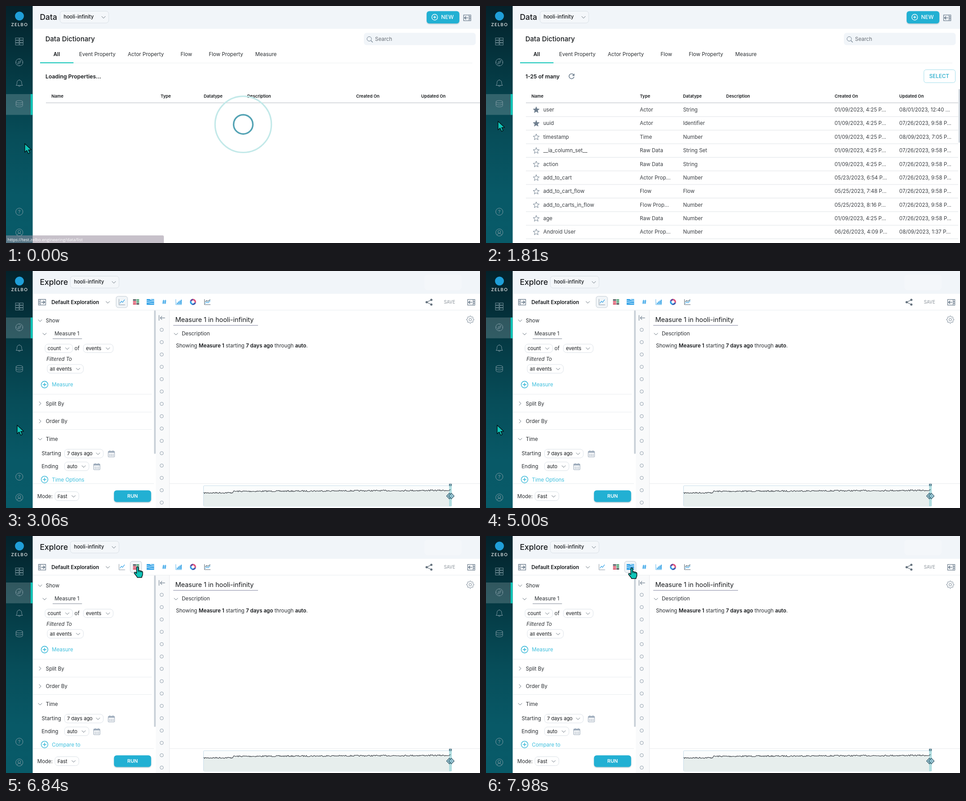
An HTML page that plays this animation: 1057x530 px, repeating every 8000 ms.

```html
<!DOCTYPE html>
<html lang="en">
<head>
<meta charset="utf-8">
<title>Data dictionary and exploration</title>
<style>
html, body { margin: 0; width: 100%; height: 100%; overflow: hidden; background: #fff; }
svg { display: block; width: 100%; height: 100%; font-family: Inter, sans-serif; }
text { white-space: pre; }
</style>
</head>
<body>
<svg id="stage" viewBox="0 0 1057 530"></svg>
<script>
const LOOP = 8000;
const INK = '#2b2f33', DARK = '#15181b', SLATE = '#6f7f8f', AQUA = '#22b0d3', TEAL = '#0fc5b8';

// Markup helpers
const attrs = o => Object.entries(o).map(([k, v]) => ` ${k}="${v}"`).join('');
const el = (tag, o, inner = '') => `<${tag}${attrs(o)}>${inner}</${tag}>`;
const rect = (x, y, w, h, fill, o = {}) => el('rect', { x, y, width: w, height: h, fill, ...o });
const circle = (cx, cy, r, o = {}) => el('circle', { cx, cy, r, fill: 'none', ...o });
const line = (d, stroke, width = 1, o = {}) =>
  el('path', { d, stroke, 'stroke-width': width, fill: 'none', ...o });
const text = (x, y, s, size = 11.6, fill = INK, weight = 400, o = {}) =>
  el('text', { x, y, 'font-size': size, fill, 'font-weight': weight, ...o }, s);
const group = (id, inner, o = {}) => el('g', { id, ...o }, inner);
const at = (x, y, inner) => el('g', { transform: `translate(${x} ${y})` }, inner);
const round = { 'stroke-linecap': 'round', 'stroke-linejoin': 'round' };

const chevron = (x, y, turn = 0, color = '#66727d') =>
  line('M-4 -2L0 2L4 -2', color, 1, { transform: `translate(${x} ${y}) rotate(${turn})`, ...round });

const pill = (x, y, w, h, label, o = {}) =>
  rect(x, y, w, h, '#fff', { rx: 7, stroke: '#dce2e8', ...o }) +
  text(x + 5.8, y + h / 2 + 4, label, 11, DARK) +
  chevron(x + w - 11.8, y + h / 2 + 0.5);

const button = (x, y, w, h) =>
  rect(x, y + 1.5, w, h, '#5f8696', { rx: 6, opacity: 0.45, filter: 'url(#soft)' }) +
  rect(x, y, w, h, AQUA, { rx: 6 });

const addLink = (y, id, label) =>
  circle(86, y, 7.5, { stroke: AQUA, 'stroke-width': 1.3 }) +
  line(`M82 ${y}h8M86 ${y - 4}v8`, AQUA, 1.3) +
  text(102.3, y + 4.3, label, 11.5, '#3dbfdd', 400, { id });

// Side panel toggle; dir -1 points left, 1 points right
const panelIcon = (x, y, dir) => el('g', { transform: `translate(${x} ${y}) scale(${dir} 1)` },
  line('M-8 -6.3H8V6.3H-8ZM-4.2 -6V6M-8 -2H-4.2M-8 2H-4.2', SLATE, 1.3) +
  line('M-2 0H5.5M2.5 -3.3L6 0L2.5 3.3', SLATE, 1.7));

const starPath = Array.from({ length: 10 }, (_, i) => {
  const r = i % 2 ? 3.1 : 7.2, a = -Math.PI / 2 + i * Math.PI / 5;
  return (i ? 'L' : 'M') + (r * Math.cos(a)).toFixed(2) + ' ' + (r * Math.sin(a)).toFixed(2);
}).join('') + 'Z';

const gearPath = Array.from({ length: 32 }, (_, i) => {
  const r = i % 4 < 2 ? 8.2 : 6.4, a = (i - 0.5) * Math.PI / 16;
  return (i ? 'L' : 'M') + (r * Math.cos(a)).toFixed(2) + ' ' + (r * Math.sin(a)).toFixed(2);
}).join('') + 'Z';

// Sidebar
const NAV_Y = { boards: 79.5, explore: 126, alerts: 172.5, data: 218.5, help: 460, account: 506.5 };
const navIcons = {
  boards: [-8, -2.4, 3.2].map(y => [-8.6, 0.7].map(x =>
    rect(x, y, 7.9, 4.6, 'none', { stroke: 'currentColor', 'stroke-width': 0.9 })).join('')).join(''),
  explore: circle(0, 0, 8, { stroke: 'currentColor' }) +
    line('M4 -4.2L1.5 1.5L-4 4.2L-1.5 -1.5ZM-1.5 -1.5L1.5 1.5M0 -8v2M0 8v-2M-8 0h2M8 0h-2', 'currentColor', 0.9),
  alerts: line('M-7.3 5H7.3C5.3 3 5.2 1 5.2 -1.2C5.2 -4.5 3 -6.8 0 -6.8S-5.2 -4.5 -5.2 -1.2C-5.2 1 -5.3 3 -7.3 5ZM-2 5.4a2 2 0 0 0 4 0M0 -6.8V-8', 'currentColor', 1),
  data: line('M-7.4 -4.4a7.4 2.8 0 0 1 14.8 0a7.4 2.8 0 0 1 -14.8 0V4.4a7.4 2.8 0 0 0 14.8 0V-4.4M-7.4 0a7.4 2.8 0 0 0 14.8 0', 'currentColor', 1),
  help: circle(0, 0, 8, { stroke: 'currentColor' }) +
    text(0, 3.8, '?', 10.5, 'currentColor', 400, { 'text-anchor': 'middle' }),
  account: circle(0, 0, 8, { stroke: 'currentColor' }) + circle(0, -1.6, 3.1, { stroke: 'currentColor' }) +
    line('M-5 6C-4.5 3.3 -2.5 2 0 2S4.5 3.3 5 6', 'currentColor', 1)
};
const NAV_COLOR = '#7f9aa3';
const sidebar =
  `<defs><linearGradient id="deep" x2="0" y2="1">
    <stop offset="0" stop-color="#04222b"/><stop offset=".25" stop-color="#043640"/>
    <stop offset=".55" stop-color="#074d59"/><stop offset=".8" stop-color="#085967"/>
    <stop offset="1" stop-color="#085a68"/></linearGradient>
    <filter id="soft"><feGaussianBlur stdDeviation="1.3"/></filter></defs>` +
  rect(0, 0, 59.5, 530, 'url(#deep)') +
  group('active', rect(0, 0, 59.5, 46.5, '#fff', { opacity: 0.18 }) + rect(55, 0, 4.5, 46.5, TEAL)) +
  circle(30, 22.5, 10, { fill: '#1f9fd8' }) +
  text(30.6, 45.3, 'ZELBO', 9.6, '#fff', 500,
    { 'text-anchor': 'middle', 'letter-spacing': 1.5, 'font-family': 'Lato, sans-serif' }) +
  Object.keys(navIcons).map(k => at(29.7, NAV_Y[k], group('nav-' + k, navIcons[k], { color: NAV_COLOR }))).join('');

const header = (title, pillX) =>
  rect(59.5, 0, 998, 51, '#f1f5f9') + text(75.4, 31, title, 17.5, DARK, 500) +
  rect(pillX, 11.5, 108.5, 26.5, '#f4f7fa', { rx: 6, stroke: '#d9e0e6' }) +
  text(pillX + 8, 28.3, 'hooli-infinity', 11.1, DARK, 500) + chevron(pillX + 97, 25.3);

// Data page
const ROWS = `user|Actor|String|01/09/2023, 4:25 P...|08/01/2023, 12:40 ...
uuid|Actor|Identifier|01/09/2023, 4:25 P...|07/26/2023, 9:58 P...
timestamp|Time|Number|01/09/2023, 4:25 P...|08/09/2023, 7:05 P...
__ia_column_set__|Raw Data|String Set|01/09/2023, 4:25 P...|07/26/2023, 9:58 P...
action|Raw Data|String|01/09/2023, 4:25 P...|07/26/2023, 9:58 P...
add_to_cart|Actor Prop...|Number|05/23/2023, 6:54 P...|07/26/2023, 9:58 P...
add_to_cart_flow|Flow|Flow|05/25/2023, 7:48 P...|07/26/2023, 9:58 P...
add_to_carts_in_flow|Flow Prop...|Number|05/25/2023, 8:16 P...|07/26/2023, 9:58 P...
age|Raw Data|Number|01/09/2023, 4:25 P...|07/26/2023, 9:58 P...
Android User|Actor Prop...|Number|06/26/2023, 4:09 P...|08/09/2023, 1:37 P...`
  .split('\n').map(r => r.split('|'));

const tableHead = (xs, right) =>
  ['Name', 'Type', 'Datatype', 'Description', 'Created On', 'Updated On']
    .map((s, i) => text(xs[i], 205, s, 9.5, DARK, 600)).join('') +
  line(`M89 216.5H${right}`, '#cbcfd3', 1.3);

const tableRow = (cells, i) => {
  const y = 232 + i * 30.37, xs = [127.7, 343, 439.4, 777.2, 921.6];
  return el('path', { d: starPath, transform: `translate(112 ${y + 0.6})`, fill: i < 2 ? SLATE : 'none',
      stroke: SLATE, 'stroke-width': 1, 'stroke-linejoin': 'round' }) +
    cells.map((s, c) => text(xs[c], y + 4.1, s, 11.6, '#3a3e43')).join('') +
    line(`M89 ${y + 15.3}H1053`, '#dfe3e6');
};

const tabs = [[105.7, 'All'], [163, 'Event Property'], [271.6, 'Actor Property'],
  [389.2, 'Flow'], [452.2, 'Flow Property'], [555.8, 'Measure']];

const dataPage = header('Data', 120.5) +
  button(938, 11.5, 73, 27.5) +
  circle(956, 25, 6.5, { stroke: '#fff', 'stroke-width': 1.3 }) + line('M952.7 25h6.6M956 21.7v6.6', '#fff', 1.3) +
  text(970.3, 29.2, 'NEW', 11.9, '#fff', 500) + panelIcon(1028.5, 26.5, -1) +
  text(87.7, 79, 'Data Dictionary', 15, DARK, 500) +
  rect(798, 60, 249.5, 27.5, '#f1f5f9', { rx: 6 }) +
  circle(810, 73.5, 5, { stroke: SLATE }) + line('M813.7 77.2L817.8 81.2', SLATE, 1.2) +
  text(823, 78, 'Search', 11.5, '#666d75') +
  tabs.map(([x, s], i) => text(x, 111.6, s, 11.6, i ? INK : DARK, i ? 400 : 600)).join('') +
  line('M76 127.5H1040', '#eceff1') + rect(76, 126, 74.5, 2, TEAL) +
  group('loading',
    text(88, 161.6, 'Loading Properties...', 12.3, DARK, 600) +
    tableHead([101.3, 344.8, 441, 538, 780.8, 925.8], 1057) +
    circle(529, 264.7, 62.8, { stroke: '#c3e9e9', 'stroke-width': 3.2 }) +
    circle(529, 264.7, 21.5, { stroke: '#54a3b4', 'stroke-width': 3.4 })) +
  group('table',
    text(88, 161.6, '1-25 of many', 12.2, DARK, 600) +
    line('M195 153.3A5.6 5.6 0 1 0 196.3 158.3', SLATE, 1.6) + el('path', { d: 'M197.3 150.8V156.3H191.8Z', fill: SLATE }) +
    rect(976.5, 142.5, 70, 29, '#fff', { rx: 5, stroke: '#a3deeb' }) +
    text(988.5, 160.8, 'SELECT', 11.7, '#22abcb', 500) +
    tableHead([101.3, 343.2, 439.2, 535.6, 777.5, 921.6], 1053) +
    ROWS.map(tableRow).join('') + rect(1053.7, 186, 3.3, 119.5, '#d0d7de'));

const statusBar = group('status',
  el('path', { d: 'M0 513H349a3 3 0 0 1 3 3V530H0Z', fill: '#9a8f9f', opacity: 0.55 }) +
  text(3.5, 525.5, 'https://test.zelbo.engineering/data/list', 9.4, '#fff', 400, { 'font-family': 'Open Sans, sans-serif' }));

const tooltip = group('tip', rect(71, 106, 46, 20.5, '#666', { rx: 3 }) +
  text(77, 119.8, 'Explore', 9.4, '#fff', 500));

// Explore page
const CHART_X = [258.5, 290, 322, 353, 385, 417, 449];
const BLUE = '#2b9fe6';
const bars = (list, fill) => list.map(([x, y, w, h]) => rect(x, y, w, h, fill)).join('');
const arc = (from, to, color) => {
  const p = a => `${(5.2 * Math.sin(a * 6.2832)).toFixed(2)} ${(-5.2 * Math.cos(a * 6.2832)).toFixed(2)}`;
  return line(`M${p(from)}A5.2 5.2 0 0 1 ${p(to)}`, color, 3.4);
};
const chartIcons = [
  line('M-6.5 -6.5V6.5H7', '#8a97a3') + line('M-4.5 3L-1 -1.5L1.5 1L6 -5', BLUE, 1.2),
  bars([[-6.8, -5.8, 7, 3], [0.9, 2.8, 6, 3]], '#454a50') +
    bars([[-6.8, -1.5, 7, 3], [-6.8, 2.8, 7, 3]], '#d8475f') +
    bars([[0.9, -5.8, 6, 3], [0.9, -1.5, 6, 3]], '#3f9b6b'),
  rect(-8.3, -6.4, 16.6, 12.8, BLUE) +
    line('M-8.3 -2.6C-3 -2.6 1 0 8.3 -1.6M-8.3 1.2C-2 1.2 1 4.4 8.3 2.8M-1 -6.4C2 -3.6 5 -3.4 8.3 -4.2', '#e4f3fc', 1.2),
  line('M-1.2 -4.7L-2.6 4.7M2.8 -4.7L1.4 4.7M-3.9 -1.6H4.3M-4.3 1.7H3.9', BLUE, 1.5),
  line('M-6.3 -6V6H7', '#5fb5ea') + bars([[-4, 1.5, 2, 3.5], [-1, -1, 2, 6], [2, -3, 2, 8], [4.8, -5, 2, 10]], BLUE),
  arc(0, 0.3, '#e0527a') + arc(0.3, 0.55, '#3a5bb0') + arc(0.55, 0.8, '#2b9fe6') + arc(0.8, 1, '#6a4a9c'),
  line('M-6.5 -6V6H7', '#54636f') + line('M-5 3.5L-1.5 0L1.5 2L6.5 -2.5', BLUE, 1.1) +
    line('M-5 -.5L-1.5 -3L1.5 -1.5L6.5 -5.2', '#3d5566', 1.1)
];

const calendar = (x, y) => at(x, y,
  rect(-7, -6, 14, 13, 'none', { rx: 1.5, stroke: '#9dabbb', 'stroke-width': 1.2 }) +
  rect(-7, -6, 14, 3.4, '#9dabbb') + line('M-3.5 -8V-4.5M3.5 -8V-4.5', '#9dabbb', 1.3) +
  line('M-4.5 .8H5M-4.5 4H5', '#9dabbb', 1.8, { 'stroke-dasharray': '2 1.6' }));

const section = (y, label, turn) => chevron(76, y, turn) + text(88.8, y + 4.3, label, 11.5);

// Event volume: flat, one step up, then a slow rise with seeded noise
let seed = 7;
const noise = () => (seed = seed * 16807 % 2147483647) / 2147483647 - 0.5;
let volume = '';
for (let x = 441; x <= 993; x += 1.6) {
  const base = x < 506 ? 496.2 - (x - 441) * 0.006 : 492.7 - (x - 506) * 0.0045;
  volume += (volume ? 'L' : 'M') + x.toFixed(1) + ' ' + (base + noise() * 2.8).toFixed(1);
}
const diamond = x => el('path', { d: `M${x} 496.8L${x + 6.2} 503.2L${x} 509.6L${x - 6.2} 503.2Z`,
  fill: '#8fc3d3', 'fill-opacity': 0.75, stroke: '#234b5c', 'stroke-width': 1.1 });

const timeline = line('M365 475.5H1057', '#e9ebed') +
  rect(440.5, 480, 553, 46, '#fbfdfd', { rx: 2, stroke: '#c6dce9' }) +
  el('path', { d: volume + 'L993 526H441Z', fill: '#e7eeed' }) +
  rect(988, 480, 6, 46, '#a9dcdf', { opacity: 0.85 }) + line(volume, '#43484e', 1.25) +
  rect(988.5, 476.5, 5, 3.5, '#9fc4d1', { stroke: '#2e5a6b' }) + diamond(988.6) + diamond(993.2);

const bold = s => el('tspan', { 'font-weight': 600, fill: DARK }, s);

const explorePage = header('Explore', 143.5) +
  rect(933, 8, 83, 35, '#f4f7fa', { rx: 7 }) +
  line('M59.5 87.5H1057', '#e9edf0') + panelIcon(80.5, 69.8, 1) +
  text(101.2, 73.8, 'Default Exploration', 11.55, DARK, 600) + chevron(227, 70) +
  CHART_X.map((x, i) => rect(x - 13, 56.5, 25.5, 25.5, '#f1f5f8', { id: 'chart' + i, rx: 5, stroke: '#c3ccd4' }) +
    at(x, 69.2, chartIcons[i])).join('') +
  line('M948.5 64.5L938 69.8L948.5 75', '#66737f', 1.3) +
  [[948.5, 64.5], [938, 69.8], [948.5, 75]].map(([x, y]) => circle(x, y, 2.5, { fill: '#66737f' })).join('') +
  text(976.4, 73.2, 'SAVE', 9.9, '#8c949c') + panelIcon(1037.5, 70, -1) +
  section(111, 'Show', 0) + chevron(86, 141) +
  text(108.2, 144.3, 'Measure 1', 11.5) + line('M104 151.5H169.5', '#7f8896') +
  pill(87, 163.5, 61.5, 19, 'count', { class: 'flag' }) + text(152.8, 177.3, 'of', 11.5) +
  pill(172.5, 163.5, 66.5, 19, 'events', { class: 'flag' }) +
  text(90.2, 200.5, 'Filtered To', 11.4, INK, 400, { 'font-style': 'italic' }) +
  pill(92, 209, 80.5, 19.5, 'all events') + addLink(254, 'measure-link', 'Measure') +
  line('M60 275.5H325M60 315.5H325M60 354.5H325M60 475.5H330', '#e9edf0') +
  section(296.3, 'Split By', -90) + section(336, 'Order By', -90) + section(376, 'Time', 0) +
  text(79.6, 412.2, 'Starting', 11.7) + pill(130.5, 398.5, 86.5, 19.5, '7 days ago') + calendar(235, 409) +
  text(79.2, 440.8, 'Ending', 11.5) + pill(130.5, 427, 54.5, 19.5, 'auto') + calendar(202.5, 437.5) +
  addLink(466.3, 'time-link', '') +
  text(69.8, 507.6, 'Mode:', 11.5) + pill(109, 493.5, 53.5, 20, 'Fast') +
  button(240.8, 490.5, 82.8, 26) +
  text(282.3, 507.3, 'RUN', 10.9, '#fff', 600, { 'text-anchor': 'middle' }) +
  rect(334, 88, 30, 442, '#f9fafb') + rect(330, 88, 4, 321, '#ccd3da', { id: 'scroll', rx: 2 }) +
  line('M364.5 88V530', '#e7eaed') +
  line('M341.3 98.8V111M344 104.9H354.5M348 100.9L344 104.9L348 108.9', SLATE, 1.1) +
  Array.from({ length: 15 }, (_, i) => circle(347.2, 131.5 + i * 27.6, 3.7, { stroke: '#8b9aa8' })).join('') +
  text(377.4, 114, 'Measure 1 in hooli-infinity', 14.45, DARK) + line('M373 121.5H562', '#8386a0', 1.2) +
  el('path', { d: gearPath, transform: 'translate(1035.3 108.7)', fill: 'none', stroke: SLATE }) +
  circle(1035.3, 108.7, 2.9, { stroke: SLATE }) +
  chevron(379, 141) + text(392, 144.2, 'Description', 11.6) +
  text(379, 170.8, `Showing ${bold('Measure 1')} starting ${bold('7 days ago')} through ${bold('auto')}.`, 11.63) +
  timeline;

const skin = { fill: TEAL, stroke: '#07161a', 'stroke-width': 1.5, 'stroke-linejoin': 'round' };
const cursor = group('cursor',
  el('path', { id: 'arrow', d: 'M.8 .8V20L5.4 16L8.8 23.2L12.2 21.6L9 14.7L15.4 14.4Z', ...skin }) +
  group('hand', el('path', { d: 'M6 2.9a2.1 2.1 0 0 1 4.2 0V10c.4-1.4 3.3-1.2 3.5.6c.6-1 3-.8 3.2.9c.8-.8 2.6-.3 2.6 1.4V17.5c0 3-1.8 4.3-2 7.3H7.5c-.4-2.6-3.5-4.8-6.4-9.2c-1-1.7.8-3.3 2.6-2.1L6 15.6Z', ...skin }) +
    line('M10.2 10V13M13.7 10.6V13.4M16.9 11.5V13.8', '#07161a', 1), { transform: 'translate(-8 -.5)' }));

document.getElementById('stage').innerHTML = rect(0, 0, 1057, 530, '#fff') +
  group('data-page', dataPage) + group('explore-page', explorePage) + sidebar + statusBar + tooltip + cursor;

// Motion: time, hotspot x, y, and the easing used to arrive there
const STEP = 20;
const easeOut = u => 1 - (1 - u) ** 2;
const easeBoth = u => u * u * (3 - 2 * u);
const PATH = [
  [0, 41, 307], [1080, 41, 307], [1500, 35, 292, u => u * u], [1800, 26, 257], [1860, 20, 202],
  [2080, 17.5, 160], [2360, 24, 130, easeOut], [2590, 24, 130],
  [2591, 24, 344], [5000, 24, 344], [5400, 316, 116, easeBoth], [5480, 325, 102],
  [5680, 293, 68.5, easeOut], [6830, 293, 68.5], [7080, 337, 45.5, easeBoth],
  [7270, 337, 45.5], [7550, 325, 75, easeBoth], [7840, 325, 75], [7960, 325, 71, easeBoth], [8000, 325, 71]
];

function pointer(t) {
  const i = PATH.findIndex(k => k[0] > t), a = PATH[i - 1], b = PATH[i];
  let u = (t - a[0]) / (b[0] - a[0]);
  if (b[3]) u = b[3](u);
  return [a[1] + (b[1] - a[1]) * u, a[2] + (b[2] - a[2]) * u];
}

const $ = id => document.getElementById(id);
const show = (id, on) => $(id).setAttribute('display', on ? 'inline' : 'none');
const flags = document.querySelectorAll('.flag');

function draw(t) {
  const exploring = t >= 2590, compare = t >= 5930;
  const [x, y] = pointer(t - t % STEP);
  show('data-page', !exploring);
  show('explore-page', exploring);
  show('loading', t < 30);
  show('table', t >= 30);
  show('status', t < 80);
  $('status').setAttribute('opacity', t < 30 ? 1 : 0.5);
  show('tip', t >= 2340 && !exploring);
  $('active').setAttribute('transform', `translate(0 ${exploring ? 104 : 197})`);

  for (const k of ['explore', 'alerts']) {
    const over = !exploring && Math.abs(y + 2 - NAV_Y[k]) < 23;
    $('nav-' + k).setAttribute('color', over ? '#fff' : NAV_COLOR);
  }

  const chosen = t >= 7900 ? 2 : compare ? 1 : 0;
  const onBar = exploring && y > 56 && y < 83;
  CHART_X.forEach((cx, i) => show('chart' + i, i === chosen || onBar && Math.abs(x - cx) < 13));
  $('scroll').setAttribute('height', compare ? 339 : 321);
  $('time-link').textContent = compare ? 'Compare to' : 'Time Options';
  const flagged = t >= 5240 && t < 5560;
  flags.forEach(f => {
    f.setAttribute('fill', flagged ? '#fadedb' : '#fff');
    f.setAttribute('stroke', flagged ? '#d0716d' : '#dce2e8');
  });

  const hand = onBar || !exploring && y < 243;
  show('cursor', !exploring || t >= 3060);
  show('hand', hand);
  show('arrow', !hand);
  $('cursor').setAttribute('transform', `translate(${x.toFixed(2)} ${y.toFixed(2)})`);
}

const start = performance.now();
function tick() {
  draw((performance.now() - start) % LOOP);
  requestAnimationFrame(tick);
}
tick();
</script>
</body>
</html>
```
